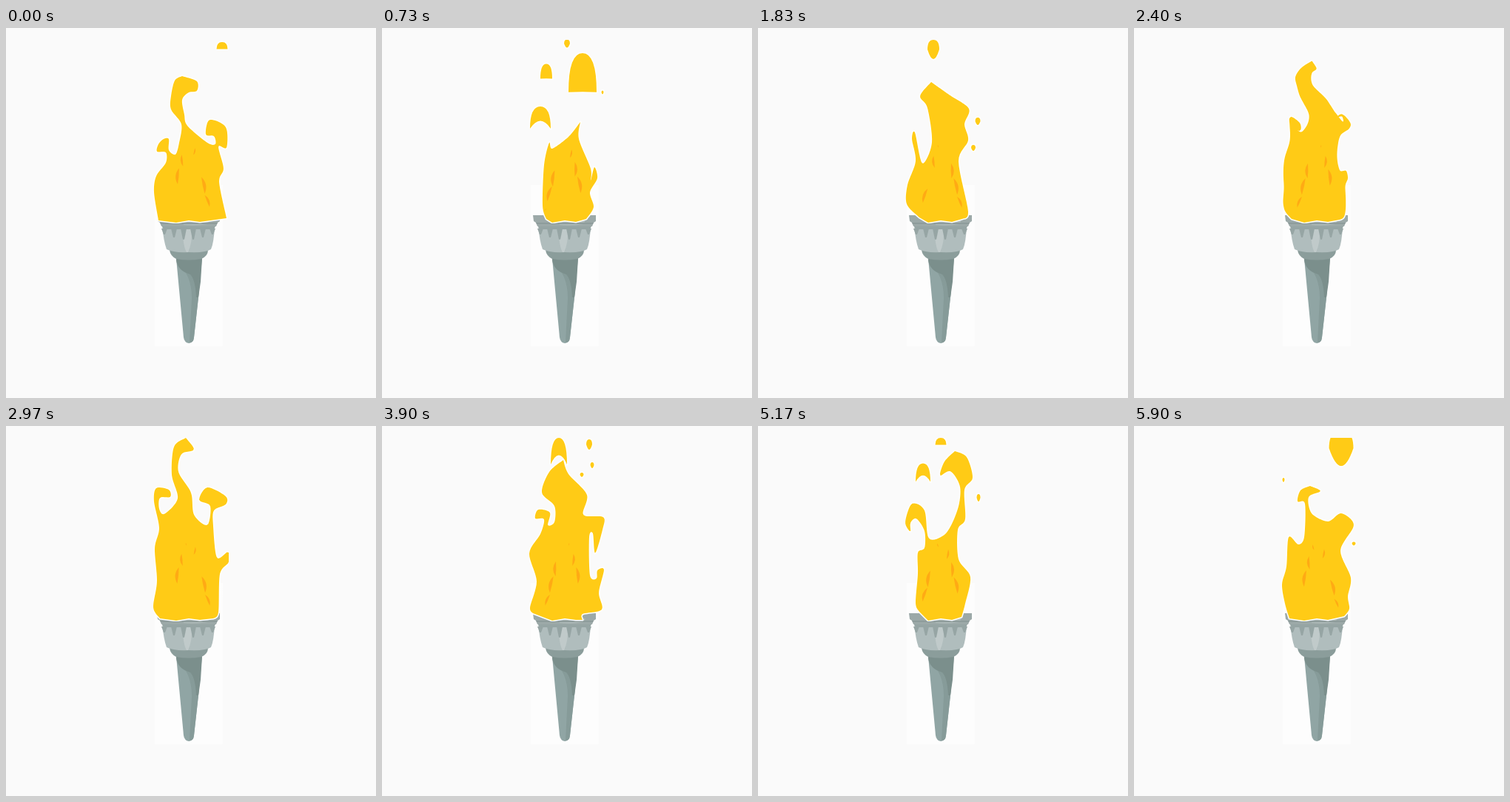
An HTML page with a canvas that plays this animation: 500 px wide and 500 px high, repeating every 6.01 s.

```html
<!DOCTYPE html>
<html lang="en">
<head>
<meta charset="utf-8">
<title>Torch</title>
<style>
html, body { margin: 0; width: 100%; height: 100%; overflow: hidden; background: #fafafa; }
canvas { display: block; width: 500px; height: 500px; }
</style>
</head>
<body>
<canvas id="stage" width="500" height="500"></canvas>
<script>
const ctx = document.getElementById('stage').getContext('2d');
const LOOP = 6010, CYCLE = 4500, REST = 5900, HALF = 150;
const YELLOW = '#ffcb16', ORANGE = '#ffaa14';

const mix = (a, b, t) => a + (b - a) * t;

// A pose has an outline from left base over the tip to right base,
// and sparks [x, y, width, height, hollow] with hollow from 0 (drop) to 1 (crescent).
function makePose(body, sparks) {
  const pts = body.trim().split(/\s+/).map(p => p.split(',').map(Number));
  const tip = pts.reduce((best, p, i) => p[1] < pts[best][1] ? i : best, 0);
  const left = resample(spline(pts.slice(0, tip + 1)));
  const right = resample(spline(pts.slice(tip)));
  return { outline: [...left, ...right], sparks };
}

function spline(pts) {
  const out = [], last = pts.length - 1;
  for (let i = 0; i < last; i++) {
    const a = pts[Math.max(0, i - 1)], b = pts[i], c = pts[i + 1], d = pts[Math.min(last, i + 2)];
    for (let t = 0; t < 1; t += .125) {
      out.push([0, 1].map(j => {
        const m = .45 * (c[j] - a[j]), n = .45 * (d[j] - b[j]), e = c[j] - b[j];
        return b[j] + t * (m + t * (3 * e - 2 * m - n + t * (m + n - 2 * e)));
      }));
    }
  }
  out.push(pts[last]);
  return out;
}

// Equal steps along a line, so that two outlines can be blended.
function resample(pts) {
  const len = [0], out = [];
  for (let i = 1; i < pts.length; i++)
    len.push(len[i - 1] + Math.hypot(pts[i][0] - pts[i - 1][0], pts[i][1] - pts[i - 1][1]));
  for (let k = 0, i = 1; k <= HALF; k++) {
    const at = len[len.length - 1] * k / HALF;
    while (i < pts.length - 1 && len[i] < at) i++;
    const f = (at - len[i - 1]) / (len[i] - len[i - 1]);
    out.push([0, 1].map(j => mix(pts[i - 1][j], pts[i][j], f)));
  }
  return out;
}

const swirl = makePose(`206,260 200,222 203,200 216,182 216,168 204,167 206,157 213,150 220,150
  220,165 229,171 234,155 237,130 223,110 223,92 228,71 238,65 258,72 258,85 247,87 238,97 241,117
  245,132 272,155 283,157 281,146 270,144 275,124 297,134 298,162 287,160 294,190 288,208 298,257`,
  [[292, 25, 15, 12, .6]]);
const arch = makePose(`219,252 213,240 216,200 216,171 225,165 225,142 214,125 206,131 206,143
  199,130 208,105 225,114 231,152 254,145 270,112 273,82 260,61 246,67 252,48 266,34 282,42 290,70
  279,86 280,126 270,140 271,180 287,204 280,240 275,258`,
  [[247, 22, 15, 12, .6], [223, 63, 20, 25, 1], [298, 97, 5, 10, 0]]);
const torn = makePose(`222,258 217,240 219,185 226,155 230,163 252,147 268,127 266,150 282,190
  282,206 287,188 291,203 281,222 286,242 276,258`,
  [[250, 21, 8, 11, 0], [271, 67, 38, 66, .6], [222, 61, 16, 25, .6], [214, 121, 28, 30, 1], [298, 87, 3, 5, 0]]);
const hook = makePose(`210,260 204,240 200,214 206,190 209,150 222,160 230,150 231,105 221,102
  225,87 238,81 252,88 236,96 240,118 262,129 280,118 297,134 279,168 293,205 289,230 291,247 284,257`,
  [[280, 30, 33, 48, 0], [202, 73, 3, 6, 0], [297, 159, 5, 5, 0]]);
const column = makePose(`218,256 201,238 202,212 213,180 208,150 212,141 222,183 235,155 229,108
  219,92 234,73 258,90 285,109 279,130 284,152 271,180 284,248 276,258`,
  [[237, 29, 16, 26, 0], [297, 126, 7, 10, 0], [291, 162, 6, 8, 0]]);
const curls = makePose(`208,260 199,245 204,210 201,165 207,138 200,102 203,84 220,86 222,96 208,97
  207,112 214,119 232,98 224,66 227,28 243,16 254,32 237,38 233,62 250,90 254,120 272,134 276,108
  261,100 272,83 297,95 297,106 281,114 280,135 285,178 300,170 301,184 289,200 287,252 280,260`, []);
const tangle = makePose(`204,253 200,245 209,210 199,172 214,146 219,126 207,125 211,113 227,117
  224,134 233,130 233,108 216,90 226,62 245,46 252,65 277,93 272,120 299,123 298,140 288,172
  285,145 280,150 281,202 290,206 291,195 300,194 293,225 297,248 271,254 271,262`,
  [[239, 34, 22, 36, 1], [280, 25, 8, 14, 0], [284, 53, 5, 8, 0], [270, 66, 5, 6, 0]]);

// Start time, pose, number of steps to the next pose
const keys = [
  [0, swirl, 12], [670, arch, 1], [730, torn, 13], [1400, hook, 8],
  [1830, column, 30], [2970, curls, 25], [3900, tangle, 14], [CYCLE, swirl, 1]
];

function paintFlame() {
  ctx.strokeStyle = '#fff';
  ctx.lineWidth = 3;
  ctx.stroke();
  ctx.fillStyle = YELLOW;
  ctx.fill();
}

// Sparks rise with age and are smaller away from their own time.
function drawSpark([x, y, width, height, hollow], scale, age) {
  const w = width / 2, h = height / 2;
  ctx.save();
  ctx.translate(x, y - age * .17);
  ctx.scale(scale, scale);
  ctx.beginPath();
  ctx.moveTo(-w, h * hollow);
  ctx.quadraticCurveTo(-w, -h, 0, -h);
  ctx.quadraticCurveTo(w, -h, w, h * hollow);
  ctx.quadraticCurveTo(0, h * (2 - 2.4 * hollow), -w, h * hollow);
  paintFlame();
  ctx.restore();
}

// Orange leaves lean outward at the base, then climb inward and fade in size.
function drawLeaves(clock) {
  ctx.fillStyle = ORANGE;
  for (let i = 0; i < 6; i++) {
    const p = (clock / 1500 + i * .38) % 1, side = i % 2 ? 1 : -1;
    const grow = Math.sqrt(Math.sin(Math.PI * p)), size = mix(14, 8, p) * grow;
    ctx.save();
    ctx.translate(248 + side * mix(27, 4, p), 246 - 88 * p);
    ctx.rotate(side * mix(-.5, .3, p));
    ctx.beginPath();
    ctx.moveTo(0, -size);
    ctx.quadraticCurveTo(side * size * .7, 0, 0, size);
    ctx.quadraticCurveTo(-side * size * .1, 0, 0, -size);
    ctx.fill();
    ctx.restore();
  }
}

function drawFlame(time) {
  let i = keys.length - 2;
  while (keys[i][0] > time) i--;
  const [start, from, steps] = keys[i], [end, to] = keys[i + 1];
  const span = end - start;
  const s = Math.floor((time - start) / span * steps + 1e-6) / steps;
  const clock = start + s * span, sway = 5 * Math.sin(Math.PI * s);
  const near = s < .5 ? from : to, age = (s < .5 ? s : s - 1) * span;
  const scale = Math.sqrt(1 - 2 * Math.min(s, 1 - s));

  ctx.save();
  ctx.beginPath();
  ctx.rect(199, 16, 102, 248);
  ctx.clip();
  ctx.lineJoin = 'round';
  if (scale > 0) near.sparks.forEach(spark => drawSpark(spark, scale, age));

  ctx.beginPath();
  from.outline.forEach(([x, y], k) => {
    const [u, v] = to.outline[k], py = mix(y, v, s);
    const lift = Math.max(0, Math.min(1, (250 - py) / 120));
    ctx.lineTo(mix(x, u, s) + sway * lift * Math.sin(py / 17 + clock / 95), py);
  });
  ctx.lineTo(262, 262);
  ctx.lineTo(247, 260);
  ctx.lineTo(230, 263);
  ctx.closePath();
  paintFlame();
  ctx.clip();
  drawLeaves(clock);
  ctx.restore();
}

function fill(color, path) {
  ctx.fillStyle = color;
  ctx.fill(new Path2D(path));
}

function drawTorch() {
  fill('#fdfdfd', 'M201,212H293V430H201Z');
  // handle
  fill('#90a5a4', 'M230,311H265L260,364 254,418Q252,426 247,426Q241,425 240,418Z');
  fill('#869b99', 'M231,318Q251,332 251,365L248,425H247Q254,426 254,418L260,364 262,335Z');
  fill('#7b8f8c', 'M230,311H265L263,343 260,364H257Q256,340 249,333Q232,328 230,314Z');
  fill('#8b9d9b', 'M221,300H273Q273,308 264,312Q247,315 230,312Q222,308 221,300Z');
  // cup with flutes
  fill('#b0bdbd', 'M211,267H282Q281,290 277,299Q270,304 247,303Q226,304 217,299Q213,288 211,267Z');
  fill('#c0caca', 'M239,272H251Q252,290 246,303H244Q239,295 239,272Z');
  fill('#96a5a4', 'M210,266H284L281,272H213Z');
  for (let i = 0; i < 6; i++) {
    const x = 214 + i * 13, drop = 279 + 7 * Math.sin(i / 5 * Math.PI);
    fill('#96a5a4', `M${x - 4},271H${x + 4}L${x + 1},${drop}H${x - 1}Z`);
  }
  // rim
  fill('#9ca9a8', 'M204,253H289V261L286,263 284,268H210L208,263 205,261Z');
  fill('#adb9b8', 'M238,260H275L272,265Q255,268 240,266Z');
  fill('#8e9c9b', 'M208,263H286L285,265H209Z');
}

function draw(now) {
  const t = now % LOOP;
  ctx.fillStyle = '#fafafa';
  ctx.fillRect(0, 0, 500, 500);
  drawTorch();
  drawFlame(Math.min(t, REST) % CYCLE);
}

const begin = performance.now();
function tick() {
  draw(performance.now() - begin);
  requestAnimationFrame(tick);
}
tick();
</script>
</body>
</html>
```
